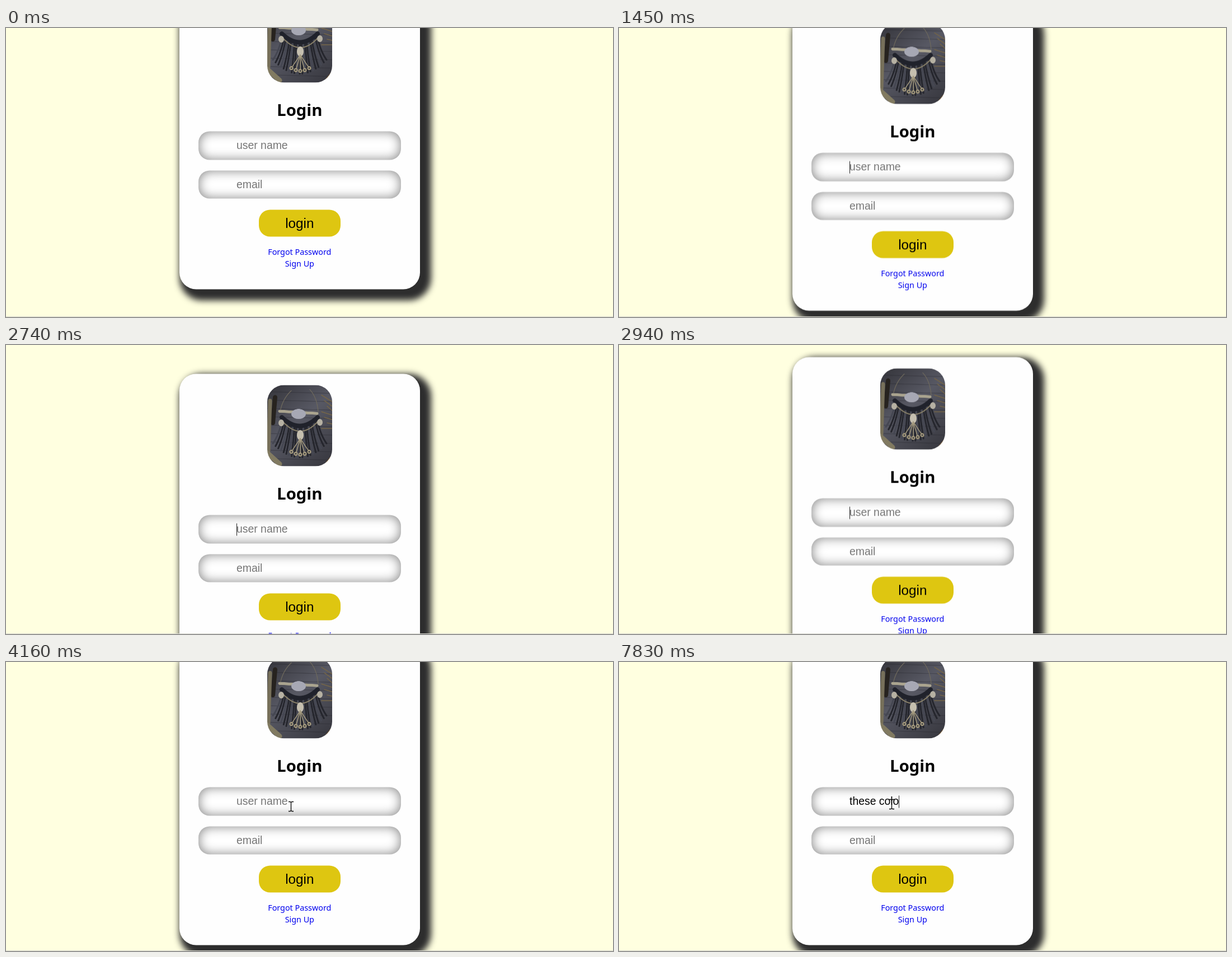
Write an HTML page with a canvas that moves like this. It is 1085x516 px and loops after 8 s.

```html
<!DOCTYPE html>
<html lang="en">
<head>
<meta charset="utf-8">
<title>Login form</title>
<style>
  html, body { margin: 0; width: 100%; height: 100%; overflow: hidden; background: #ffffe0; }
  #stage { position: relative; width: 1085px; height: 516px; overflow: hidden; background: #ffffe0; }
  #card, #card div, #card canvas, #card svg, #mouse, #edge { position: absolute; }
  #card {
    left: 310px; top: 0; width: 429.5px; height: 534px; border-radius: 30px;
    background: #fefefe; box-shadow: 10px 10px 12px 10px #2d2d2d; will-change: transform;
  }
  .field {
    left: 34.3px; width: 361.5px; height: 50.5px; border-radius: 20px;
    background: #fff; box-shadow: inset 0 0 20px gray;
  }
  #button { left: 141.7px; top: 391.8px; width: 146px; height: 48.6px; border-radius: 20px; background: #dec611; }
  #photo { left: 156.5px; top: 19.5px; width: 116px; height: 145.6px; border-radius: 30px; }
  #labels { left: 0; top: 0; }
  text { white-space: pre; }
  .input { font: 19.4px "Liberation Sans", Arial, sans-serif; }
  .hint { fill: #757575; }
  .press { font: 24.25px "Liberation Sans", Arial, sans-serif; }
  .title { font: bold 29.3px "Noto Sans", sans-serif; }
  .link { font: 14.35px "Noto Sans", sans-serif; fill: #00e; }
  .mid { text-anchor: middle; }
  #caret { left: 102px; top: 266.5px; width: 1px; height: 22px; background: #222; }
  #mouse { left: 0; top: 0; overflow: visible; }
  #edge { left: 0; top: 515px; width: 1085px; height: 1px; background: #d9d9d0; }
</style>
</head>
<body>
<div id="stage">
  <div id="card">
    <canvas id="photo" width="232" height="292"></canvas>
    <div class="field" style="top:252px"></div>
    <div class="field" style="top:321.8px"></div>
    <div id="button"></div>
    <svg id="labels" width="430" height="534">
      <text class="title mid" x="214.8" y="224">Login</text>
      <text class="input hint" id="hint" x="102" y="283.7">user name</text>
      <text class="input" id="typed" x="102" y="283.7"></text>
      <text class="input hint" x="102" y="353.6">email</text>
      <text class="press mid" x="214.8" y="424.4">login</text>
      <text class="link mid" x="214.8" y="472.6">Forgot Password</text>
      <text class="link mid" x="214.8" y="493.5">Sign Up</text>
    </svg>
    <div id="caret"></div>
  </div>
  <svg id="mouse" width="1" height="1">
    <path id="arrow" d="M0 0V16L4 12.5 6.6 18.4 9 17.3 6.4 11.6H11.5Z" fill="#fff" stroke="#000"/>
    <path id="beam" d="M-4 -8.5H-1.2L.5 -7.5 2.2 -8.5H5M.5 -7.5V7.5M-4 8.5H-1.2L.5 7.5 2.2 8.5H5" fill="none" stroke="#000" stroke-width="1.3"/>
  </svg>
  <div id="edge"></div>
</div>
<script>
const LOOP = 8000;
const PHRASE = "these colo";
const KEYS = [5220, 5360, 5560, 5890, 6440, 6570, 7170, 7370, 7630, 7830];
const el = id => document.getElementById(id);
const clamp = v => Math.max(0, Math.min(1, v));
const swing = p => (1 - Math.cos(Math.PI * clamp(p))) / 2;

// Evenly spaced redraw times, floored to 10 ms
const spread = (from, to, n) => Array.from({ length: n },
  (_, i) => Math.floor((from + (to - from) * i / (n - 1)) / 10) * 10);

const TICKS = [0,
  ...spread(1250, 1800, 9),
  ...spread(2610, 3150, 9), 3280, 3350, 3390,
  ...spread(3550, 4290, 12), 4360, 4490];

const hold = t => TICKS.filter(k => k <= t).pop();

function cardTop(t) {
  return -67.5 + 131 * swing((t - 1250) / 550) - 92 * swing((t - 2540) / 850);
}

function caretOn(t) {
  if (t < 1250) return false;
  return !(t >= 3960 && t < 4490) && !(t >= 5020 && t < 5220);
}

const pen = document.createElement("canvas").getContext("2d");
function textWidth(s) {
  pen.font = '19.4px "Liberation Sans", Arial, sans-serif';
  return pen.measureText(s).width;
}

function placeMouse(t, top) {
  el("mouse").style.display = t < 3550 ? "none" : "block";
  const left = Math.pow(1 - clamp((t - 3550) / 940), 3);
  const x = Math.round(487 + 458 * left), y = Math.round(253.5 + 96.5 * left);
  const inField = [252, 321.8].some(f => y > top + f && y < top + f + 50.5) && x > 344 && x < 706;
  el("beam").style.display = inField ? "" : "none";
  el("arrow").style.display = inField ? "none" : "";
  el("mouse").style.transform = `translate(${x}px, ${y}px)`;
}

function render(t) {
  const tick = hold(t), top = cardTop(tick);
  el("card").style.transform = `translateY(${top}px)`;
  const text = PHRASE.slice(0, KEYS.filter(k => k <= t).length);
  if (el("typed").textContent !== text) el("typed").textContent = text;
  el("hint").style.display = text ? "none" : "";
  el("caret").style.display = caretOn(t) ? "" : "none";
  el("caret").style.transform = `translateX(${Math.round(textWidth(text))}px)`;
  placeMouse(tick, top);
}

function paintPhoto() {
  const c = el("photo").getContext("2d");
  c.scale(2, 2);
  c.lineCap = "round";
  const line = (color, width, x1, y1, x2, y2, bx = (x1 + x2) / 2, by = (y1 + y2) / 2) => {
    c.strokeStyle = color;
    c.lineWidth = width;
    c.beginPath();
    c.moveTo(x1, y1);
    c.quadraticCurveTo(bx, by, x2, y2);
    c.stroke();
  };
  const oval = (color, x, y, rx, ry) => {
    c.fillStyle = color;
    c.beginPath();
    c.ellipse(x, y, rx, ry, 0, 0, 7);
    c.fill();
  };

  const wood = c.createLinearGradient(0, 0, 116, 146);
  wood.addColorStop(0, "#34343a");
  wood.addColorStop(0.45, "#585964");
  wood.addColorStop(1, "#36363d");
  c.fillStyle = wood;
  c.fillRect(0, 0, 116, 146);
  for (let y = 12; y < 146; y += 15) line("rgba(30,30,38,.3)", 1.2, 0, y, 116, y + 3);

  // Twigs and dry grass around the edges
  line("#27231f", 8, 14, 22, 10, 68);
  line("#77705a", 7, 5, 28, 2, 118);
  line("#817a61", 9, 0, 122, 22, 142);
  for (let i = 0; i < 7; i++) line("#766647", 1.5, 116, 30 + i * 8, 97 + i % 3 * 5, 18 + i * 10);
  line("#705431", 4, 116, 128, 103, 144);

  // Cord, fringe, stick and hanging beads
  line("#6f6a5d", 1.2, 23, 48, 43, 10, 27, 25);
  line("#6f6a5d", 1.2, 91, 48, 76, 8, 89, 22);
  for (let i = 0; i <= 20; i++) {
    const u = i / 10 - 1;
    line(i % 3 ? "#25262d" : "#454752", 3, 58 + 31 * u, 76 - 14 * u * u,
      58 + 48 * u, 130 - 25 * u * u, 58 + 37 * u, 100 - 10 * u * u);
  }
  line("#20222b", 8, 26, 58, 90, 58, 58, 89);
  line("#8d846b", 1.8, 28, 66, 90, 66, 59, 100);
  line("#aaa48f", 5, 22, 47, 89, 51);
  oval("#a7a8b4", 56, 52, 13, 9);
  oval("#b6b1a3", 25, 68, 5, 6);
  oval("#b6b1a3", 94, 67, 5, 6);
  oval("#c5bfaf", 59, 90, 6, 9);
  for (let i = 0; i < 5; i++) {
    const x = 43 + i * 8, y = 120 + 5 * Math.sin(i * Math.PI / 4);
    line("#a59b80", 1.5, 59, 96, x, y);
    oval("#a69b7e", x, y, 3.6, 3.6);
    oval("#393a40", x, y, 1.4, 1.4);
  }
}

paintPhoto();
const start = performance.now();
function loop() {
  render((performance.now() - start) % LOOP);
  requestAnimationFrame(loop);
}
loop();
</script>
</body>
</html>
```
